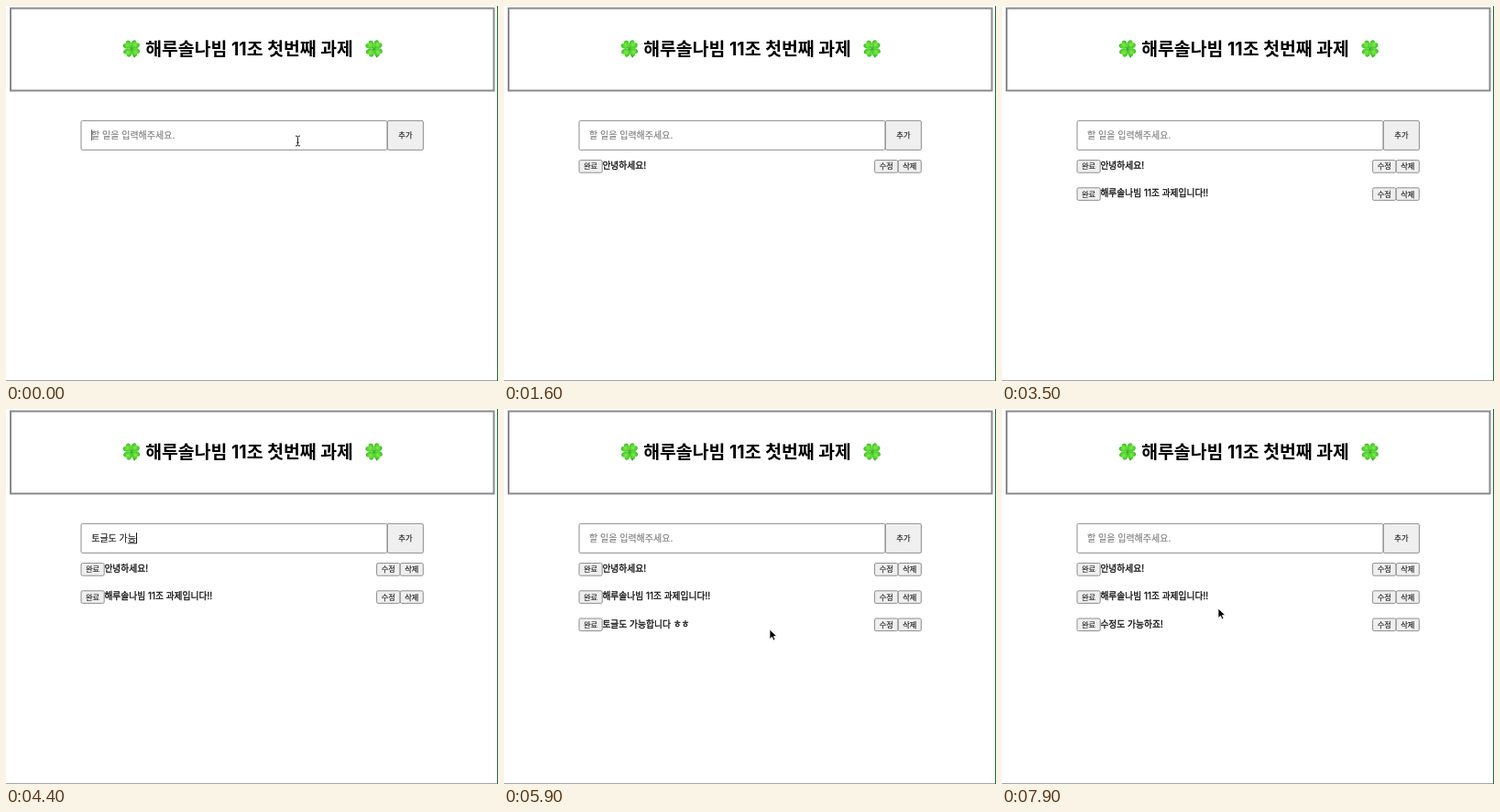
These frames come from a looping animation (537x410 px, 8 s). An HTML page:

```html
<!DOCTYPE html>
<html lang="ko">
<head>
<meta charset="utf-8">
<title>할 일 목록</title>
<style>
  html, body { margin: 0; width: 100%; height: 100%; overflow: hidden; background: #fff; }
  svg { display: block; width: 537px; height: 410px; }
  text { font-family: Inter, "Noto Sans CJK KR", "Noto Sans CJK", sans-serif; white-space: pre; }
</style>
</head>
<body>
<svg id="stage" viewBox="0 0 537 410" xmlns="http://www.w3.org/2000/svg">
  <defs>
    <radialGradient id="leaf" cx="50%" cy="40%" r="62%">
      <stop offset="0" stop-color="#86ea4c"/>
      <stop offset=".6" stop-color="#4cd02b"/>
      <stop offset="1" stop-color="#259c17"/>
    </radialGradient>
    <g id="clover">
      <path d="M0 0Q1 5 3.2 9" fill="none" stroke="#35a821" stroke-width="1.7" stroke-linecap="round"/>
      <g id="leaves"></g>
    </g>
    <path id="arrow" d="M0 0V10.6L2.5 8.3L4.2 12.1L6 11.3L4.4 7.6H7.8Z"
      fill="#000" stroke="#fff" stroke-width=".8" stroke-linejoin="round"/>
    <path id="beam" d="M-2.5-5.5Q0-5.5 0-4Q0-5.5 2.5-5.5M0-4V4M-2.5 5.5Q0 5.5 0 4Q0 5.5 2.5 5.5M-1.2 1.8H1.2"
      fill="none" stroke="#222" stroke-width="1"/>
  </defs>
  <rect x="5" y="2.5" width="527.5" height="90" fill="#fff" stroke="#8a888d" stroke-width="2"/>
  <rect y="409" width="537" height="1" fill="#a4a4a4"/>
  <rect x="536" width="1" height="410" fill="#1d6a34"/>
  <use href="#clover" x="137" y="46.5"/>
  <use href="#clover" x="401.7" y="46.5"/>
  <g id="live"></g>
</svg>
<script>
const LOOP = 8000, STEP = 100;
const TEAM = '해루솔나빔';
const HINT = '할 일을 입력해주세요.';
const FIRST = '안녕하세요!';
const SECOND = TEAM + ' 11조 과제입니다!!';
const THIRD = '토글도 가능합니다 ㅎㅎ';
const EDITED = '수정도 가능하죠!';
const FONT = 'Inter, "Noto Sans CJK KR", "Noto Sans CJK", sans-serif';
const INPUT_SIZE = 10, ROW_SIZE = 9.75, SMALL = 8.3;

const live = document.getElementById('live');
const pen = document.createElement('canvas').getContext('2d');

document.getElementById('leaves').innerHTML = [42, 132, 222, 312].map(a =>
  `<path transform="rotate(${a})" d="M0 0C-2-2.5-5.2-4-4.7-7.3C-4.2-10-1.2-10.2 0-8.2C1.2-10.2 4.2-10 4.7-7.3C5.2-4 2-2.5 0 0Z" fill="url(#leaf)"/>`
).join('');

// Timeline: each event patches the state from its moment on
const events = [];
const at = (ms, patch) => events.push([ms, patch]);
const type = (ms, field, steps) => steps.forEach((s, i) => at(ms + i * STEP, { [field]: s, caret: 1 }));
const prefixes = (text, ends) => ends.map(n => text.slice(0, n));

at(0, { input: '', caret: 0.75, rows: [], edit: null, beam: true, done: false, press: false, selected: false });
at(100, { beam: false });
type(200, 'input', ['ㅇ', '아', '안']);
at(600, { caret: 0.5 });
at(700, { caret: 0 });
type(800, 'input', prefixes(FIRST, [1, 2, 3, 4, 6]));
at(1300, { input: '', rows: [FIRST] });
at(1500, { caret: 0.5 });
at(1600, { caret: 0 });
type(1800, 'input', ['ㅎ', ...prefixes(SECOND, [1, 2, 4, 5, 7, 10, 11, 13, 14])]);
type(2800, 'input', [SECOND.slice(0, 14) + 'ㄷ', ...prefixes(SECOND, [15, 16, 17])]);
at(3200, { input: SECOND });
at(3300, { input: '', rows: [FIRST, SECOND] });
at(3500, { caret: 0 });
type(3700, 'input', ['ㅌ', '토', '토글']);
type(4200, 'input', prefixes(THIRD, [3, 5, 6, 7, 8, 11, 12]));
at(4900, { input: '', rows: [FIRST, SECOND, THIRD] });
at(5100, { caret: 0, press: true });
at(5200, { press: false, done: true });
at(5400, { press: true });
at(5500, { press: false, done: false });
at(6300, { edit: THIRD, caret: 1 });
at(6400, { selected: true, caret: 0 });
at(6600, { selected: false });
type(6600, 'edit', ['숮', ...prefixes(EDITED, [2, 3, 5, 6, 7, 9])]);
at(7400, { caret: 0 });
at(7600, { edit: null, rows: [FIRST, SECOND, EDITED] });
events.sort((a, b) => a[0] - b[0]);

const stateAt = t => Object.assign({}, ...events.filter(e => e[0] <= t).map(e => e[1]));

const paths = [
  [[5000, 318, 251], [5100, 86.8, 233.8], [5600, 88, 236], [5900, 290, 241], [6000, 360, 243.5], [6200, 416, 235], [6400, 416, 235]],
  [[7800, 156, 233], [7900, 236, 218], [8000, 236, 218]]
];

function mouseAt(t) {
  for (const p of paths) {
    for (let i = 0; i + 1 < p.length; i++) {
      const [a, b] = [p[i], p[i + 1]];
      if (t >= a[0] && t < b[0]) {
        const k = (t - a[0]) / (b[0] - a[0]);
        return [a[1] + (b[1] - a[1]) * k, a[2] + (b[2] - a[2]) * k];
      }
    }
  }
  return null;
}

const width = (s, size) => {
  pen.font = `${size}px ${FONT}`;
  return pen.measureText(s).width;
};

// Text centred vertically on cy
const text = (s, x, cy, size, extra = '') =>
  `<text x="${x}" y="${cy + size * 0.37}" font-size="${size}" ${extra}>${s}</text>`;

// Fill with a thin outline, for a weight between regular and bold
const ink = (color, extra = 0) => `fill="${color}" stroke="${color}" stroke-width="${extra}"`;

const box = (x, y, w, h, fill, stroke, sw = 1, r = 1.5) =>
  `<rect x="${x}" y="${y}" width="${w}" height="${h}" rx="${r}" fill="${fill}" stroke="${stroke}" stroke-width="${sw}"/>`;

const button = (label, x, y, w, h, down) =>
  box(x, y, w, h, down ? '#dedede' : '#efefef', down ? '#707070' : '#8e8e8e') +
  text(label, x + w / 2, y + h / 2, SMALL, 'text-anchor="middle" ' + ink('#1a1a1a', 0.12));

// Typed text with composing underline, spelling dots and caret
function field(s, x, cy, size, caret) {
  const end = x + width(s, size), low = cy + size * 0.56;
  let out = text(s, x, cy, size, ink('#1a1a1a', 0.15));
  if (/[ㄱ-힣]$/.test(s) && caret) {
    const from = x + width(s.slice(0, -1), size);
    out += `<path d="M${from} ${low}H${end}" stroke="#222" stroke-width="1"/>`;
  }
  if (s.startsWith(TEAM + ' ')) {
    out += `<path d="M${x + 0.5} ${low}h${width(TEAM, size)}" stroke="#e0392f" stroke-width="1.4" stroke-dasharray="1.4 1.2"/>`;
  }
  const half = size * 0.6;
  return out + `<path d="M${end + 0.5} ${cy - half}v${half * 2}" stroke="#111" stroke-width="1" opacity="${caret}"/>`;
}

function row(label, i, st) {
  const y = 168.6 + i * 30.2, cy = y + 6.7, last = i === 2;
  if (last && st.edit !== null) {
    const mark = st.selected
      ? `<rect x="85" y="${cy - 5}" width="${width(st.edit, SMALL)}" height="10.5" fill="#b3d7ff"/>` : '';
    return box(82.2, y + 0.9, 95.8, 12.4, '#fff', '#3a76c8', 1.5) + mark +
      field(st.edit, 84.8, cy + 0.2, SMALL, st.caret) +
      button('변경', 179.3, y, 25, 13.6) + button('취소', 204.8, y, 24.7, 13.6);
  }
  const strike = last && st.done
    ? `<path d="M107.5 ${cy - 0.3}h${width(label, ROW_SIZE)}" stroke="#111" stroke-width=".9"/>` : '';
  return button('완료', 82, y, 25.2, 13.6, last && st.press) +
    text(label, 107.4, cy - 0.8, ROW_SIZE, ink('#111', 0.3)) + strike +
    button('수정', 404.6, y, 25.4, 13.6) + button('삭제', 430.3, y, 25, 13.6);
}

function draw(t) {
  const st = stateAt(t), mouse = mouseAt(t);
  const mainCaret = st.edit === null && t < 7600 ? st.caret : 0;
  let out = text(TEAM + ' 11조 첫번째 과제', 152.2, 47, 19.4, 'font-weight="700"');
  out += box(82, 125.4, 334, 32, '#fff', '#8e8e8e');
  out += button('추가', 416.4, 125.4, 39, 32);
  if (!st.input) out += text(HINT, 93, 141.2, INPUT_SIZE, ink('#7f7f7f', 0.15));
  out += field(st.input, 93.2, 141.2, INPUT_SIZE, mainCaret);
  out += st.rows.map((label, i) => row(label, i, st)).join('');
  if (st.beam) out += '<use href="#beam" x="318.5" y="147.5"/>';
  if (mouse) out += `<use href="#arrow" x="${mouse[0]}" y="${mouse[1]}"/>`;
  live.innerHTML = out;
}

let shown = -1;
const start = performance.now();
function tick() {
  const t = Math.floor((performance.now() - start) % LOOP / STEP) * STEP;
  if (t !== shown) draw(shown = t);
  requestAnimationFrame(tick);
}
tick();
</script>
</body>
</html>
```
